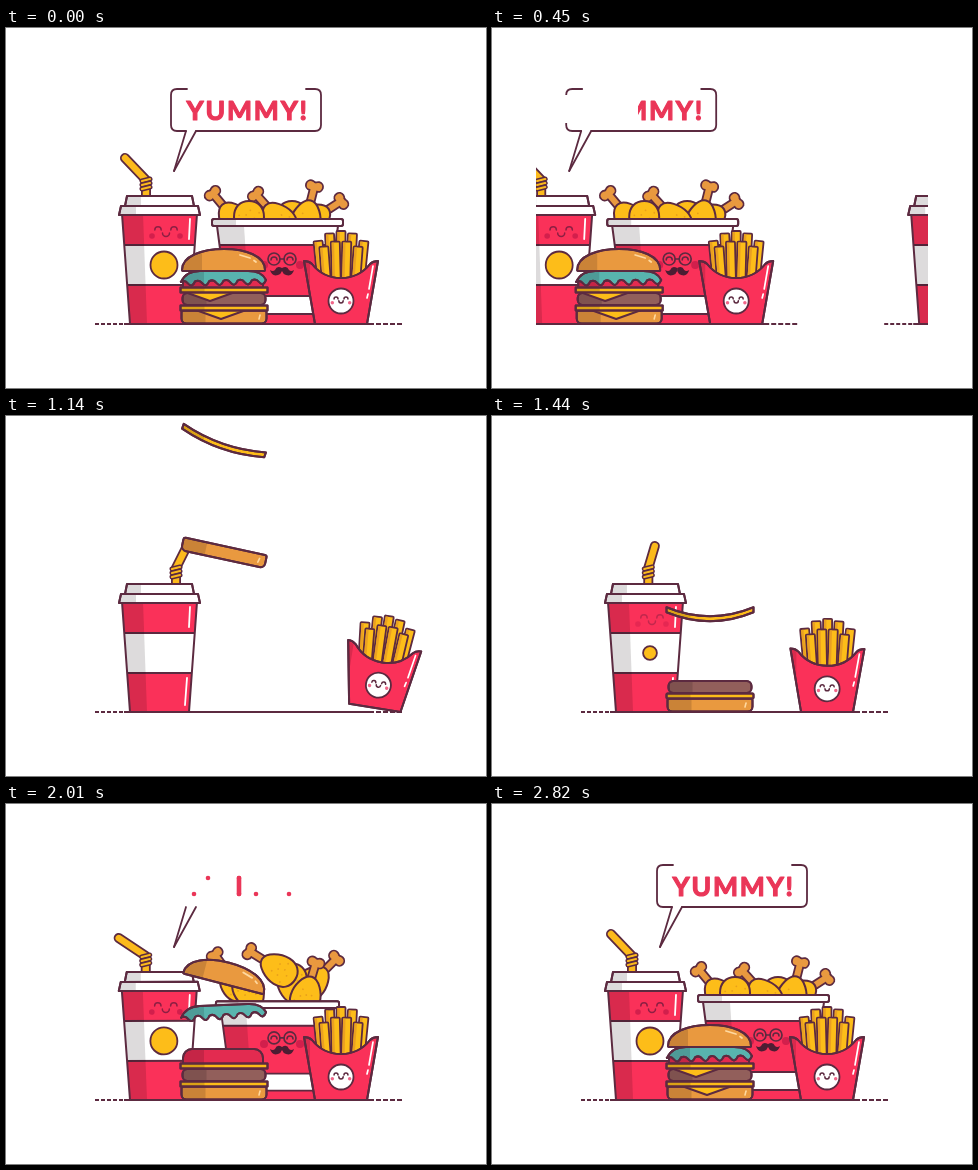
Animation of 480x360 px, one loop 2850 ms. Source, as an HTML page with a canvas:

```html
<!DOCTYPE html>
<html lang="en">
<head>
<meta charset="utf-8">
<title>Yummy</title>
<style>
html, body { margin: 0; width: 100%; height: 100%; overflow: hidden; background: #fff; }
canvas { display: block; width: 480px; height: 360px; }
</style>
</head>
<body>
<canvas id="stage" width="480" height="360"></canvas>
<script>
const c = document.getElementById('stage').getContext('2d');
const LOOP = 2850, GAP = 394, FLOOR = 296, SPEED = 1.75;
const INK = '#5c2a40', RED = '#fa3159', YELLOW = '#fdbd19', ORANGE = '#e9993f',
  TEAL = '#58b4ae', SHADE = 'rgba(20,0,10,.14)', GLINT = '#ffd9a0', TEXT = '#ea3658';

const clamp = v => Math.max(0, Math.min(1, v));
const mix = (a, b, p) => a + (b - a) * p;
const part = (t, a, b) => clamp((t - a) / (b - a));
const smooth = p => p * p * (3 - 2 * p);
const ramp = (t, a, b) => smooth(part(t, a, b));
const bump = (t, a, b) => Math.sin(Math.PI * part(t, a, b));
const cubic = p => p < .5 ? 4 * p ** 3 : 1 - 4 * (1 - p) ** 3;
const rad = d => d * Math.PI / 180;

// Damped swing that begins at time a
function swing(t, a, size, period, fade) {
  const s = Math.max(0, t - a);
  return size * Math.sin(2 * Math.PI * s / period) * Math.exp(-s / fade);
}

// Everything standing jumps when the bucket hits the floor
const LAND = 1590;
const hop = t => bump(t, 1620, 1800);
const squash = t => bump(t, 1880, 2120);

function at(x, y, angle, draw) {
  c.save();
  c.translate(x, y);
  c.rotate(rad(angle));
  draw();
  c.restore();
}

// Tips an object over its left or right foot
function lean(angle, left, right, draw) {
  const x = angle < 0 ? left : right;
  at(x, FLOOR, angle, () => { c.translate(-x, -FLOOR); draw(); });
}

function paint(path, fill, width = 2) {
  c.fillStyle = fill;
  c.fill(path);
  c.strokeStyle = INK;
  c.lineWidth = width;
  c.stroke(path);
}

function shaded(path, fill, x) {
  paint(path, fill);
  c.save();
  c.clip(path);
  c.fillStyle = SHADE;
  c.fillRect(x - 100, -200, 100, 600);
  c.restore();
  c.stroke(path);
}

function line(pts, color = INK, width = 2) {
  c.beginPath();
  pts.forEach(p => c.lineTo(...p));
  c.strokeStyle = color;
  c.lineWidth = width;
  c.stroke();
}

function dot(x, y, r, fill, edge) {
  const p = new Path2D();
  p.arc(x, y, r, 0, 7);
  if (edge) return paint(p, fill, 1.8);
  c.fillStyle = fill;
  c.fill(p);
}

function arc(x, y, r, from, to, color, width = 1.5) {
  c.beginPath();
  c.arc(x, y, r, from, to);
  c.strokeStyle = color;
  c.lineWidth = width;
  c.stroke();
}

const poly = pts => new Path2D('M' + pts.map(p => p.join(' ')).join('L') + 'Z');

function box(x, y, w, h, r) {
  const p = new Path2D();
  p.roundRect(x, y, w, h, r);
  return p;
}

function face(x, y, s, eye, cheek) {
  for (const k of [-1, 1]) {
    arc(x + k * 8 * s, y, 3.2 * s, Math.PI, 0, eye);
    dot(x + k * 14 * s, y + 6 * s, 2.8 * s, cheek);
  }
  arc(x, y + 3 * s, 3.5 * s, 0, Math.PI, eye);
}

// Tapered container: red and white stripes, shaded left side
function tub(x1, x2, inset, tops, colors, shade) {
  const p = poly([[x1, tops[0]], [x2, tops[0]], [x2 - inset, FLOOR], [x1 + inset, FLOOR]]);
  c.save();
  c.clip(p);
  tops.forEach((y, i) => {
    c.fillStyle = colors[i % 2];
    c.fillRect(x1, y, x2 - x1, FLOOR - y);
    if (i) line([[x1, y], [x2, y]]);
  });
  c.fillStyle = SHADE;
  c.fill(poly([[x1, tops[0]], [x1 + shade, tops[0]], [x1 + shade + inset / 2, FLOOR], [x1, FLOOR]]));
  c.restore();
  c.strokeStyle = INK;
  c.lineWidth = 2;
  c.stroke(p);
}

// The straw swivels from right to left, then overshoots a little
function straw(t) {
  const x = mix(164, 170, ramp(t, 690, 1140)) - 30 * ramp(t, 1300, 1600);
  const dx = 11 - 32 * ramp(t, 1300, 1900) - 6 * bump(t, 1880, 2140);
  const dy = -21 + 4 * bump(t, 1880, 2140);
  const warm = part(t, 800, 1100);
  const color = `rgb(${mix(238, 252, warm)},${mix(123, 186, warm)},${mix(56, 28, warm)})`;
  const pts = [[x, 168], [x, 152], [x + dx, 151 + dy]];
  line(pts, INK, 10);
  line(pts, color, 6.4);
  for (let y = 152; y < 163; y += 4) {
    const ring = [[x - 4, y + 1], [x + 4, y - 1]];
    line(ring, INK, 5);
    line(ring, color, 2.2);
  }
}

function cup(t) {
  const tilt = swing(t, 600, -4.9, 360, 150) + swing(t, 1600, 8.75, 440, 120);
  lean(tilt, 124, 183, () => {
    straw(t);
    tub(116, 191, 8, [186, 217, 257], [RED, '#fff'], 21);
    shaded(poly([[121, 168], [186, 168], [188, 178], [119, 178]]), '#fff', 135);
    shaded(poly([[115, 178], [192, 178], [194, 187], [113, 187]]), '#fff', 130);
    line([[184, 191], [183, 211]], '#fff', 1.8);
    line([[181, 262], [179, 289]], '#fff', 1.8);
    const pop = ramp(t, 1380, 1500);
    if (!pop) return;
    dot(158, 237, 13.5 * pop, YELLOW, true);
    c.globalAlpha = pop;
    face(160, 202, 1, '#8d1f43', '#d21f4c');
    c.globalAlpha = 1;
  });
}

// Falling place and angle, then resting x and angle
const legs = [
  [232, 92, -109, 229, -130], [314, 93, -90, 306, -33], [277, 91, 77, 286, 90],
  [295, 132, -64, 300, -76], [277, 52, 153, 273, 228], [237, 117, -23, 243, 90]
];

function leg(t, [x1, y1, a1, x2, a2]) {
  const p = Math.sin(part(t, 1710, 1890) * Math.PI / 2);
  const bounce = (132 - y1) * .33 * bump(t, 1890, 2130);
  const y = mix(y1, 192, p) - bounce - Math.max(0, 1710 - t);
  if (y < -70) return;
  const turn = ramp(t, 1710, 2140);
  at(mix(x1, x2, p), y, mix(a1, a2, turn), () => {
    for (const edge of [1.8, 0]) {
      const col = edge ? INK : ORANGE;
      line([[8, 0], [35, 0]], col, 6 + edge * 2);
      for (const k of [-3.8, 3.8]) dot(35, k, 4 + edge, col);
    }
    paint(new Path2D('M20 0C20 8 7 15 -3 15S-19 9 -19 0S-13 -15 -3 -15S20 -8 20 0Z'), YELLOW);
    for (let i = 0; i < 8; i++) {
      const r = 3 + i * 1.2;
      dot(Math.cos(i * 2.4) * r - 2, Math.sin(i * 2.4) * r, .9, '#e8a01c');
    }
  });
}

function glasses(x, y) {
  for (const k of [-1, 1]) {
    arc(x + k * 8, y, 6, 0, 7, INK, 1.7);
    arc(x + k * 8, y + 1, 3, Math.PI, 0, INK);
    dot(x + k * 18, y + 6, 4, '#d21f4c');
    at(x, y + 9, 0, () => {
      c.scale(k, 1);
      c.fillStyle = '#4c1d33';
      c.fill(new Path2D('M0 0Q5 -3 7 2Q9 4 12 2Q10 9 4 7Q1 6 0 3Z'));
    });
  }
  line([[x - 2, y], [x + 2, y]], INK, 1.7);
}

function bucket(t) {
  const y = -Math.max(0, LAND - t) * 2.4 - 35 * hop(t);
  if (y < -320) return;
  const thin = t < LAND ? 1 : hop(t);
  c.save();
  c.translate(271, FLOOR + y);
  c.scale(1 - .13 * thin - .06 * squash(t), 1 - .06 * squash(t));
  c.translate(-271, -FLOOR);
  tub(211, 332, 13, [198, 217, 268, 286], ['#fff', RED], 27);
  shaded(box(206, 191, 131, 7, 2), '#fff', 230);
  c.restore();
  glasses(276 + 4 * thin, 231 + y + 3 * squash(t));
}

// Drops at a steady speed, tilted in proportion to its height
function piece(t, land, rest, jump, spin, draw) {
  const h = Math.max(0, land - t) * SPEED + jump * hop(t);
  if (h < rest + 40) at(218, rest - h, spin * Math.min(h, 270), () => draw(h));
}

function slab(w, h, bend, color, r) {
  const x = w / 2, y = h / 2;
  const path = bend
    ? new Path2D(`M${-x} ${-y}Q0 ${bend * 2 - y} ${x} ${-y}V${y}Q0 ${bend * 2 + y} ${-x} ${y}Z`)
    : box(-x, -y, w, h, r);
  shaded(path, color, 24 - x);
}

const cheese = (t, tip, soft) => h => {
  const drip = ramp(t, 2060, 2160);
  if (drip) paint(poly([[tip - 28, 1], [tip + 28, 1], [tip, 1 + 10 * drip]]), YELLOW);
  slab(87, 5, Math.min(9, h * soft), YELLOW, 1);
};

function bottomBun() {
  slab(85, 13, 0, ORANGE, [2, 2, 5, 5]);
  line([[36, -2], [35, 2]], GLINT, 1.6);
}

function tomato(h) {
  if (h) slab(86, 12, 0, RED, 2);
  else shaded(box(-41, -8, 80, 16, [9, 9, 2, 2]), '#e32b50', -20);
}

function lettuce() {
  let d = 'M-43 5Q-38 -6 -24 -6H24Q38 -6 42 3';
  for (let i = 0; i < 6; i++) d += 'q-3 7 -7 2q-3 -4 -7.2 -1.7';
  shaded(new Path2D(d + 'Z'), TEAL, -20);
}

function topBun() {
  shaded(new Path2D('M-42 0C-42 -14 -22 -21 0 -21S41 -14 41 0Q41 1 39 1H-40Q-42 1 -42 0Z'), ORANGE, -22);
  line([[16, -15], [26, -12]], GLINT, 1.8);
  line([[30, -9.5], [32, -8]], GLINT, 1.8);
}

function burger(t) {
  piece(t, 1228, 289, 12, .08, bottomBun);
  piece(t, 1829, 253, 0, .09, tomato);
  piece(t, 1390, 271, 23, .04, () => slab(83, 12, 0, '#925f5b', 5));
  piece(t, 1287, 280, 14, .075, cheese(t, -3, .023));
  piece(t, 1480, 262, 35, 0, cheese(t, -14, .26));
  piece(t, 2035, 249, 0, -.06, lettuce);
  piece(t, 2047, 242, 0, .23, topBun);
}

function fry(x, y) {
  at(x, y, (x - 335) * .25, () => {
    paint(box(-4.5, 0, 9, 50, 1), YELLOW, 1.8);
    c.fillStyle = '#eaa022';
    c.fillRect(-3.6, 1, 2.4, 48);
  });
}

// Slides in braking, leaning back, then rocks upright
function fries(t) {
  if (t < 970) return;
  const x = 181 * (1 - part(t, 970, 1270)) ** 2;
  const tilt = Math.min(10, x * .27) + swing(t, 1270, -6, 300, 90);
  c.save();
  c.translate(x, 0);
  lean(tilt, 309, 361, () => {
    for (let i = -2; i <= 2; i++) fry(335 + i * 11.5, 203 + i * i * 2.5);
    for (let i = -1.5; i <= 1.5; i++) fry(335 + i * 11.5, 213 + i * i * 2.5);
    shaded(new Path2D('M298 233Q303 233 306 236Q317 250 335 250T364 236Q367 233 372 233L361 296H309Z'), RED, 304);
    line([[367, 238], [363, 261]], '#fff', 1.7);
    line([[362, 266], [361, 270]], '#fff', 1.7);
    dot(335, 273, 12.5, '#fff', true);
    face(335, 271, .62, INK, '#f0668a');
  });
  c.restore();
}

function ground() {
  c.lineCap = 'butt';
  line([[118, FLOOR], [368, FLOOR]]);
  for (let i = 0; i < 5; i++) {
    line([[89 + i * 6, FLOOR], [93 + i * 6, FLOOR]]);
    if (i < 4) line([[370 + i * 7, FLOOR], [375 + i * 7, FLOOR]]);
  }
  c.lineCap = 'round';
}

function trace(d, length, p) {
  c.setLineDash([length * p, 999]);
  c.strokeStyle = INK;
  c.lineWidth = 1.8;
  c.stroke(new Path2D(d));
  c.setLineDash([]);
}

// Points from which the lettering spreads
const seeds = [[188, 90], [202, 74], [233, 74], [233, 90], [250, 90], [283, 90]];

function lettering(t) {
  const grow = part(t, 2010, 2220);
  if (t > 1980 && grow < .3) {
    seeds.forEach(([x, y]) => dot(x, y, 2.3, TEXT));
    line(seeds.slice(2, 4), TEXT, 4.6);
  }
  if (!grow) return;
  c.save();
  if (grow < 1) {
    const area = new Path2D();
    seeds.forEach(([x, y]) => {
      area.moveTo(x, y);
      area.arc(x, y, 26 * grow, 0, 7);
    });
    c.clip(area);
  }
  c.font = '700 26.5px Lato, sans-serif';
  c.letterSpacing = '1.8px';
  c.textAlign = 'left';
  c.fillStyle = c.strokeStyle = TEXT;
  c.lineWidth = 1.2;
  c.fillText('YUMMY!', 180.5, 92);
  c.strokeText('YUMMY!', 180.5, 92);
  c.restore();
}

function bubble(t, off) {
  if (t < 1940) return;
  const tail = part(t, 1940, 2000), p = part(t, 2015, 2220);
  trace('M168 143L180 103', 42, tail);
  trace('M168 143L190 103', 46, tail);
  if (p) {
    trace('M190 103H309Q315 103 315 97V67Q315 61 309 61H300', 190, p);
    trace('M180 103H171Q165 103 165 97V67Q165 61 171 61H181', 80, p);
  }
  lettering(t);
  // The leaving bubble is wiped at the left of the stage
  if (off < 0) {
    c.fillStyle = '#fff';
    c.fillRect(44 - off, 67, 102, 28);
  }
}

function scene(t, off) {
  c.save();
  c.translate(off, 0);
  bubble(t, off);
  ground();
  if (t > 1480) legs.forEach(l => leg(t, l));
  bucket(t);
  cup(t);
  burger(t);
  fries(t);
  c.restore();
}

const start = performance.now();

function frame() {
  const t = (performance.now() - start) % LOOP;
  const slide = part(t, 176, 888), off = -GAP * cubic(slide);
  c.fillStyle = '#fff';
  c.fillRect(0, 0, 480, 360);
  c.save();
  c.beginPath();
  c.rect(44, 0, 392, 360);
  c.clip();
  c.lineJoin = c.lineCap = 'round';
  if (slide < 1) scene(LOOP, off);
  if (slide > 0) scene(t, off + GAP);
  c.restore();
  requestAnimationFrame(frame);
}
frame();
</script>
</body>
</html>
```
